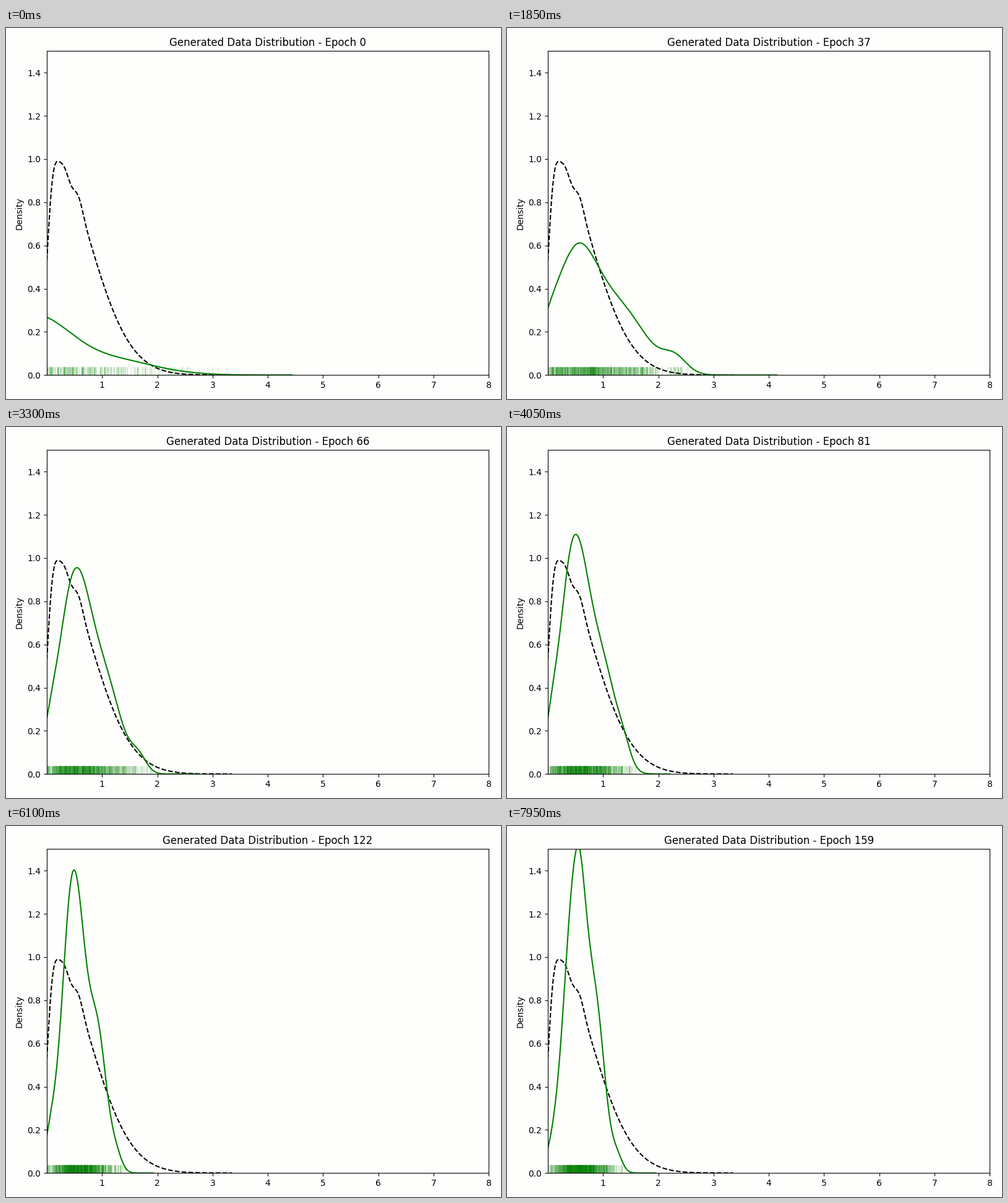
A matplotlib script that plays this animation: 800 px wide and 600 px high, repeating every 8000 ms.

```python
import math

import matplotlib.pyplot as plt
import numpy as np
from matplotlib.animation import FuncAnimation

FRAMES, INTERVAL = 160, 50
SAMPLES = 800
PAPER = "#fefefc"
GRID = np.linspace(0, 8, 1601)

# Key epochs and how the main hump and its right shoulder develop over them.
KEYS = [0, 21, 37, 66, 97, 122, 159]
PEAK = [.257, .452, .497, .912, 1.235, 1.405, 1.45]
CENTRE = [-.288, .16, .48, .51, .45, .485, .525]
LEFT = [.62, .405, .46, .3, .21, .2, .22]
RIGHT = [.62, .405, .38, .3, .245, .207, .167]
SHOULDER = [.078, .25, .31, .35, .47, .56, .68]
SHOULDER_X = [1, 1.1, 1.25, 1.1, .95, .93, .88]
SHOULDER_W = [.85, .45, .5, .27, .2, .16, .16]


def hump(height, centre, left, right=None):
    """Bell curve on GRID, optionally with a different width on each side."""
    width = np.where(GRID < centre, left, right or left)
    return height * np.exp(-.5 * ((GRID - centre) / width) ** 2)


def real_density():
    """Half-normal data seen through a narrow smoothing kernel."""
    rise = .5 + .5 * np.vectorize(math.erf)(GRID * 11 / math.sqrt(2))
    bumps = hump(.035, .59, .07) - hump(.02, .43, .06) - hump(.02, .21, .06)
    return hump(1.06, 0, .753) * rise + bumps


def generated_density(epoch, rng):
    peak, centre, left, right, sh, sx, sw = (
        np.interp(epoch, KEYS, track) for track in
        (PEAK, CENTRE, LEFT, RIGHT, SHOULDER, SHOULDER_X, SHOULDER_W))
    spread = 1 / (1 + math.exp((epoch - 60) / 10))
    y = hump(peak, centre, left, right) + hump(sh, sx, sw)
    y += hump(.07 * min(1, epoch / 20), 1.25 + 1.15 * spread,
              .1 + .4 * math.exp(-epoch / 30))
    y += hump(.13 * math.exp(-((epoch - 108) / 45) ** 2), .06, .1)
    y *= 1 + .01 * np.sin(5 * GRID + rng.uniform(0, 2 * np.pi))
    return y, 1.85 + 2.5 * spread + rng.exponential(.1)


def rug_values(y, rng):
    mass = np.cumsum(y) * (GRID[1] - GRID[0])
    count = int(SAMPLES * min(mass[-1], 1))
    return np.interp(rng.random(count) * mass[-1], mass, GRID)


fig, ax = plt.subplots(figsize=(8, 6), dpi=100, facecolor=PAPER)
ax.set_facecolor(PAPER)
ax.set_xlim(0, 8)
ax.set_ylim(0, 1.5)
ax.set_xticks(range(1, 9))
ax.set_yticks(np.arange(0, 1.5, .2))
ax.set_ylabel("Density")
title = ax.set_title("Generated Data Distribution - Epoch 0")
fig.tight_layout()
box = ax.get_position()
ax.set_position(box.translated(-.0003, 0))

rug = ax.vlines([0], 0, .025, color="green", alpha=.15, lw=1,
                transform=ax.get_xaxis_transform())
inside = GRID <= 3.35
ax.plot(GRID[inside], real_density()[inside], "--", color="black", lw=1.5)
line, = ax.plot([], [], color="green", lw=1.5)


def draw(epoch):
    rng = np.random.default_rng(100 + epoch)
    y, end = generated_density(epoch, rng)
    shown = GRID <= end
    line.set_data(GRID[shown], y[shown])
    rug.set_segments([[(x, 0), (x, .025)] for x in rug_values(y, rng)])
    title.set_text(f"Generated Data Distribution - Epoch {epoch}")
    return line, rug, title


anim = FuncAnimation(fig, draw, frames=FRAMES, interval=INTERVAL,
                     init_func=lambda: draw(0), repeat=True, repeat_delay=0)
plt.show()
```
